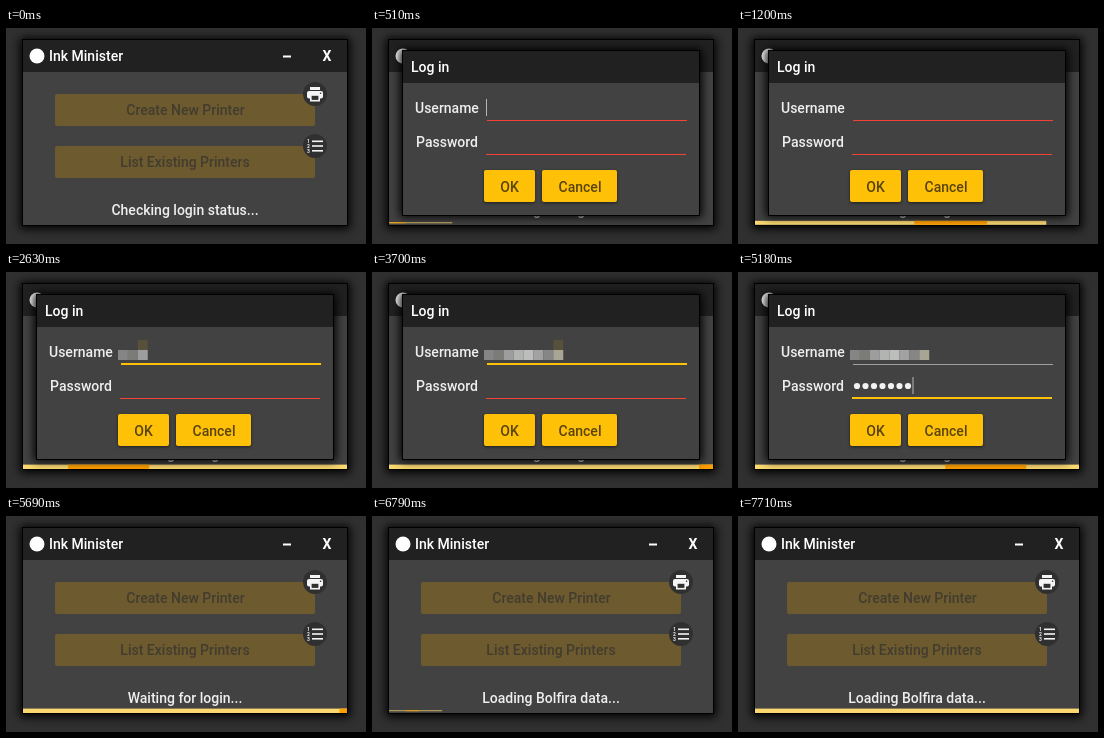
These frames come from a looping animation (360 px wide and 216 px high, 8000 ms). An HTML page:

```html
<!DOCTYPE html>
<html lang="en">
<head>
<meta charset="utf-8">
<title>Login dialog</title>
<style>
  html, body { margin: 0; width: 100%; height: 100%; overflow: hidden; background: #303030; }
  svg { display: block; width: 360px; height: 216px; }
  text { font: 500 14px Roboto, Arial, sans-serif; fill: #eee; }
  .mid { text-anchor: middle; }
  .shade { fill: #000; filter: blur(5px); }
  .off { fill: #6d5a2e; }
  .off-label { fill: #433d2f; }
  .gold { fill: #ffc107; filter: drop-shadow(0 1px 1.5px rgba(0, 0, 0, .55)); }
  .gold-label { fill: #59440c; }
  .badge { fill: #303030; }
  .icon { fill: #f4f4f4; }
  .num { font-size: 5px; font-weight: 700; }
</style>
</head>
<body>
<svg viewBox="0 0 360 216">
  <!-- main window -->
  <rect class="shade" x="14" y="10" width="330" height="191"/>
  <rect x="16" y="11" width="326" height="187" fill="#000"/>
  <rect x="17" y="12" width="324" height="185" fill="#424242"/>
  <rect x="17" y="12" width="324" height="32" fill="#212121"/>
  <circle cx="31" cy="28" r="7.5" fill="#fff"/>
  <text x="43" y="33" style="fill:#fff">Ink Minister</text>
  <rect x="277" y="27.5" width="8" height="2" fill="#fff"/>
  <text class="mid" x="321" y="33" style="fill:#fff;font-weight:700">X</text>

  <rect class="off" x="49" y="66" width="260" height="32" rx="2"/>
  <text class="mid off-label" x="179.5" y="87">Create New Printer</text>
  <rect class="off" x="49" y="118" width="260" height="32" rx="2"/>
  <text class="mid off-label" x="179" y="139">List Existing Printers</text>

  <circle class="badge" cx="309" cy="66" r="12"/>
  <g class="icon">
    <rect x="304" y="59" width="10" height="3"/>
    <rect x="301" y="63" width="16" height="7.5" rx="2"/>
    <rect x="304" y="66" width="10" height="7.5"/>
    <rect x="305.6" y="67.8" width="6.8" height="4.1" class="badge"/>
    <circle cx="314.6" cy="65.2" r=".8" class="badge"/>
  </g>
  <circle class="badge" cx="309" cy="118" r="12"/>
  <g class="icon">
    <rect x="306" y="112.5" width="11" height="1.6"/>
    <rect x="306" y="117.2" width="11" height="1.6"/>
    <rect x="306" y="122" width="11" height="1.6"/>
    <text class="num" x="301" y="115">1</text>
    <text class="num" x="301" y="120">2</text>
    <text class="num" x="301" y="125">3</text>
  </g>

  <text id="status" class="mid" x="179" y="187"></text>
  <g id="bar">
    <rect y="-2.2" width="324" height="4.4" fill="#fbd870"/>
    <rect id="runner" y="-2.2" height="4.4" fill="#ffa000"/>
  </g>

  <!-- login dialog -->
  <g id="dialog">
    <rect class="shade" x="28" y="21" width="302" height="168"/>
    <rect x="30" y="22" width="298" height="166" fill="#000"/>
    <rect x="31" y="23" width="296" height="164" fill="#424242"/>
    <rect x="31" y="23" width="296" height="32" fill="#212121"/>
    <text x="39" y="44" style="fill:#fff">Log in</text>
    <text x="43" y="85">Username</text>
    <text x="44" y="119">Password</text>
    <rect id="userLine" x="115" width="200"/>
    <rect id="passLine" x="114" width="200"/>
    <g id="mosaic"></g>
    <g id="bullets" fill="#f2f2f2"></g>
    <rect id="caret" width="1" height="17" fill="#b5b5b5"/>
    <rect class="gold" x="112" y="142" width="51" height="32" rx="2"/>
    <text class="mid gold-label" x="137.5" y="164">OK</text>
    <rect class="gold" x="170" y="142" width="75" height="32" rx="2"/>
    <text class="mid gold-label" x="208" y="164">Cancel</text>
  </g>
</svg>
<script>
const LOOP = 8000, WIDTH = 324;
const OPEN = 180, CLOSE = 5450, SWITCH = 3790;
const RED = '#f44336', GOLD = '#ffc107', GREY = '#a0a0a0';
const userKeys = { start: 2260, step: 150, max: 8 };
const passKeys = { start: 4080, step: 140, max: 7 };
const cellShades = ['#858585', '#7b7b78', '#9d9d9d', '#b2b4b2', '#bdbdbd', '#a2a2a2', '#868686', '#a9a595'];
const barScale = [[320, 0], [1300, 1], [5890, 1], [6630, 0], [7611, 1]];
const statuses = [
  [0, 'Checking login status...'],
  [OPEN, 'Waiting for login...'],
  [5920, 'Loading Bolfira data...']
];

const $ = id => document.getElementById(id);
const clamp = (v, lo = 0, hi = 1) => Math.min(hi, Math.max(lo, v));
const set = (el, attrs) => { for (const k in attrs) el.setAttribute(k, attrs[k]); };

function add(parent, tag, attrs) {
  const el = document.createElementNS('http://www.w3.org/2000/svg', tag);
  set(el, attrs);
  return parent.appendChild(el);
}

const cells = cellShades.map((fill, i) =>
  add($('mosaic'), 'rect', { x: 112 + i * 9.9, y: 78, width: 9.95, height: 10, fill }));
const tip = add($('mosaic'), 'rect', { y: 68, width: 9.9, height: 10, fill: '#57503a' });
const dots = Array.from({ length: passKeys.max }, (_, i) =>
  add($('bullets'), 'circle', { cx: 119 + i * 8.5, cy: 114, r: 3.1 }));

const typed = (keys, t) => clamp(Math.floor((t - keys.start) / keys.step) + 1, 0, keys.max);

function track(points, t) {
  if (t <= points[0][0]) return points[0][1];
  for (let i = 1; i < points.length; i++) {
    const [t0, a] = points[i - 1], [t1, b] = points[i];
    if (t < t1) return a + (b - a) * (t - t0) / (t1 - t0);
  }
  return points[points.length - 1][1];
}

function underline(el, y, color) {
  const height = color === GOLD ? 2 : 1;
  set(el, { y: color === GOLD ? y - 1 : y, height, fill: color });
}

function drawBar(t) {
  const scale = track(barScale, t);
  set($('bar'), { transform: `translate(17 194.8) scale(${scale})` });
  const left = ((t + 6) * 0.2475) % (1.5 * WIDTH) - 0.375 * WIDTH;
  const x = clamp(left, 0, WIDTH);
  set($('runner'), { x, width: clamp(left + WIDTH / 4, 0, WIDTH) - x });
}

function drawFields(t) {
  const users = typed(userKeys, t), passes = typed(passKeys, t);
  const inPass = t >= SWITCH;
  underline($('userLine'), 92, inPass ? GREY : users ? GOLD : RED);
  underline($('passLine'), 126, passes ? GOLD : RED);
  cells.forEach((c, i) => set(c, { opacity: i < users ? 1 : 0 }));
  set(tip, { x: 112 + (users - 1) * 9.9, opacity: users && !inPass ? 1 : 0 });
  dots.forEach((d, i) => set(d, { opacity: i < passes ? 1 : 0 }));

  // the caret blinks, and stays lit just after a key
  const last = passes ? passKeys.start + (passes - 1) * passKeys.step : SWITCH;
  const since = inPass ? t - last : t - 280;
  const lit = Math.floor(since / 520) % 2 === 0 && (inPass || !users);
  set($('caret'), {
    x: passes ? 115 + passes * 8.5 : 114,
    y: inPass ? 105 : 71,
    opacity: lit ? 1 : 0
  });
}

function drawDialog(t) {
  const shown = clamp((t - OPEN) / 200) * (1 - clamp((t - CLOSE) / 160));
  const eased = 1 - (1 - shown) ** 3;
  const s = 0.92 + 0.08 * eased;
  set($('dialog'), {
    opacity: eased,
    transform: `translate(179 105) scale(${s}) translate(-179 -105)`
  });
}

function render(t) {
  const label = statuses.filter(([at]) => t >= at).pop()[1];
  if ($('status').textContent !== label) $('status').textContent = label;
  drawBar(t);
  drawFields(t);
  drawDialog(t);
}

const begin = performance.now();
function tick() {
  render((performance.now() - begin) % LOOP);
  requestAnimationFrame(tick);
}
render(0);
requestAnimationFrame(tick);
</script>
</body>
</html>
```
